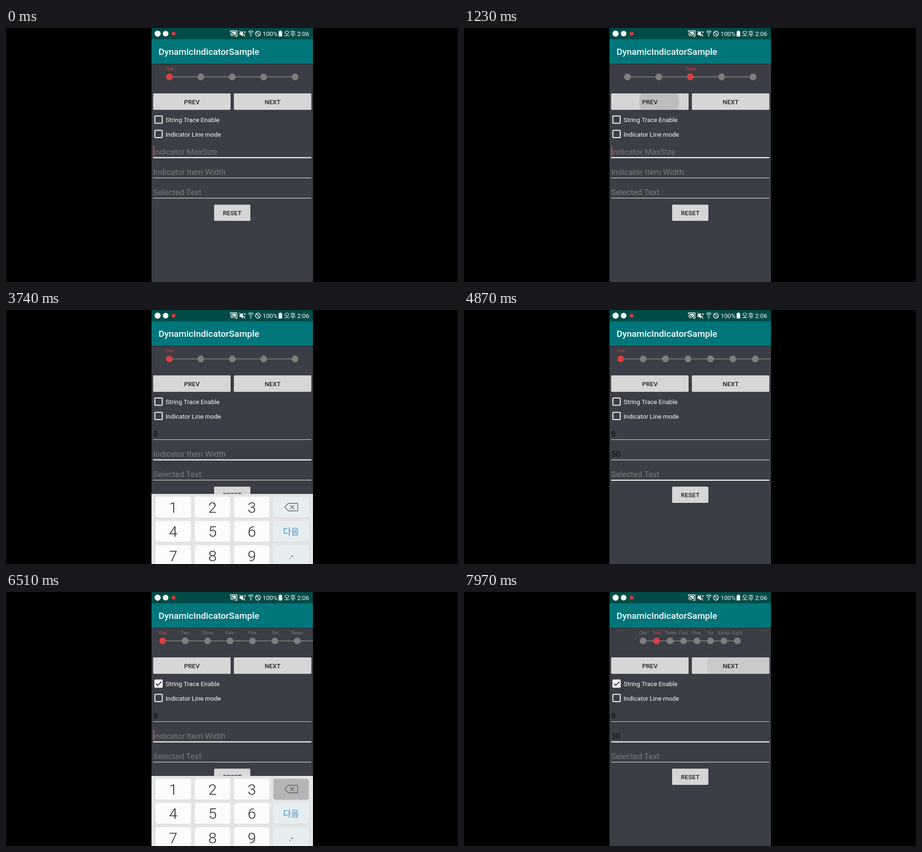
Animation, 960 px wide and 540 px high, one loop 8 s. Source, as an HTML page with a canvas:

```html
<!DOCTYPE html>
<html lang="en">
<head>
<meta charset="utf-8">
<title>DynamicIndicatorSample</title>
<style>
  html, body { margin: 0; width: 100%; height: 100%; overflow: hidden; background: #000; }
  canvas { display: block; }
</style>
</head>
<body>
<canvas id="stage" width="960" height="540"></canvas>
<script>
const ctx = document.getElementById('stage').getContext('2d');
const LOOP = 8000, LEFT = 309, WIDTH = 343;
const FONT = 'Roboto, "Noto Sans CJK KR", "Noto Sans CJK", sans-serif';
const NAMES = ['One', 'Two', 'Three', 'Four', 'Five', 'Six', 'Seven', 'Eight'];
const HINTS = ['Indicator MaxSize', 'Indicator Item Width', 'Selected Text'];
const KEYS = ['1', '2', '3', '⌫', '4', '5', '6', '다음', '7', '8', '9', '.-'];
const PALE = '#fafafa', PANEL = '#3b3e46', BUTTON = '#d6d6d6', GREY = '#7e7e7e', RED = '#d84040';

// Each track lists [start time, value]; a value holds until the next one.
const tracks = {
  selected: [[0, 0], [120, 1], [270, 2], [420, 3], [570, 4], [950, 3], [1130, 2], [1310, 1], [1490, 0], [7780, 1]],
  count: [[0, 5], [4700, 8]],
  itemWidth: [[0, 70], [4700, 50], [7300, 30]],
  trace: [[0, false], [5250, true]],
  focus: [[0, 0], [3200, 1], [4500, 2], [6000, 1]],
  maxSize: [[0, ''], [3000, '8']],
  widthText: [[0, ''], [3950, '5'], [4150, '50'], [6250, '5'], [6450, ''], [6850, '3'], [7000, '30']],
  caret: [[0, 0], [2000, 2000], [3000, 3000], [3200, 3200], [4150, 4150], [5100, 5100],
    [6000, 6000], [6450, 6450], [7000, 7000]]
};
const nextTaps = [120, 270, 420, 570, 7780];
const prevTaps = [950, 1130, 1310, 1490];
const keyTaps = [[3000, '8'], [3200, '다음'], [3950, '5'], [4500, '다음'], [6250, '⌫'], [6450, '⌫'], [6850, '3']];
const keyboardShown = [[2600, 4600], [6000, 7200]];

const valueAt = (name, t) => tracks[name].filter(k => k[0] <= t).pop()[1];
const clamp = x => Math.max(0, Math.min(1, x));

function rect(x, y, w, h, color, radius = 0) {
  ctx.fillStyle = color;
  ctx.beginPath();
  ctx.roundRect(x, y, w, h, radius);
  ctx.fill();
}
function disc(x, y, r, color) {
  ctx.fillStyle = color;
  ctx.beginPath();
  ctx.arc(x, y, r, 0, Math.PI * 2);
  ctx.fill();
}
function stroke(path, color, width) {
  ctx.strokeStyle = color;
  ctx.lineWidth = width;
  ctx.stroke(new Path2D(path));
}
function fillPath(path, color) {
  ctx.fillStyle = color;
  ctx.fill(new Path2D(path));
}
function text(str, x, baseline, size, color, align = 'left', weight = 400) {
  ctx.font = `${weight} ${size}px ${FONT}`;
  ctx.textAlign = align;
  ctx.fillStyle = color;
  ctx.fillText(str, x, baseline);
}

function drawHeader() {
  rect(LEFT, 0, WIDTH, 24, '#004b46');
  disc(322, 12, 6.5, PALE);
  disc(339, 12, 6, PALE);
  disc(356, 12, 4, '#c9403f');
  stroke('M476.5 9V6H490.5V17.5H486M476.5 11A7 7 0 0 1 483 17.5M476.5 14A4 4 0 0 1 480 17.5', PALE, 1.5);
  fillPath('M479 8H488V15H485A9 9 0 0 0 479 9.5Z', PALE);
  fillPath('M496 9.5H499L503 6V18L499 14.5H496Z', PALE);
  stroke('M496 6L508 18M506 7V10M508 7V11M506 13V15', PALE, 1.3);
  stroke('M514.5 8.5Q520 4 525.5 8.5M516.5 11.5Q520 8.5 523.5 11.5M520 13V18', PALE, 1.5);
  stroke('M529.7 12A5.3 5.3 0 1 0 540.3 12A5.3 5.3 0 1 0 529.7 12M531.5 8.3L538.5 15.7', PALE, 1.4);
  text('100%', 545, 17, 13.2, PALE);
  rect(579, 7, 7.5, 11, PALE, 1);
  rect(581, 5.5, 3.5, 2, PALE);
  text('오후', 590, 17, 14, PALE);
  text('2:06', 644, 17, 13.4, PALE, 'right');
  rect(LEFT, 24, WIDTH, 52, '#00767a');
  rect(LEFT, 76, WIDTH, 1.5, '#2b2f35');
  text('DynamicIndicatorSample', 324, 57, 19.06, PALE, 'left', 500);
}

function drawIndicator(t) {
  const count = valueAt('count', t), selected = valueAt('selected', t);
  const step = valueAt('itemWidth', t) * 0.953;
  const first = LEFT + Math.max(0, (WIDTH - count * step) / 2) + step / 2;
  rect(first, 103, step * (count - 1), 2, '#757575');
  for (let i = 0; i < count; i++) {
    const active = i === selected, x = first + i * step;
    disc(x, 104, 7.2, active ? RED : GREY);
    if (active || valueAt('trace', t)) text(NAMES[i], x, 89.5, 9.5, active ? RED : GREY, 'center');
  }
}

function drawButton(label, x, y, w, h, taps, t) {
  rect(x, y, w, h, BUTTON, 2);
  ctx.save();
  ctx.beginPath();
  ctx.roundRect(x, y, w, h, 2);
  ctx.clip();
  for (const tap of taps) {
    const age = t - tap;
    if (age < 0 || age > 300) continue;
    ctx.globalAlpha = 1 - clamp((age - 80) / 220);
    disc(x + w * 0.62, y + h / 2, 12 + age * 0.3, '#bcbcbc');
  }
  ctx.restore();
  text(label, x + w / 2, y + h / 2 + 5, 13.34, '#222', 'center', 500);
}

function drawCheckbox(label, y, checked) {
  ctx.strokeStyle = PALE;
  ctx.lineWidth = 2;
  ctx.beginPath();
  ctx.roundRect(316.2, y - 7.8, 15.6, 15.6, 1.5);
  ctx.stroke();
  if (checked) {
    rect(316, y - 8, 16, 16, PALE, 1);
    stroke(`M318.5 ${y}L322.3 ${y + 4}L330 ${y - 4}`, PANEL, 2);
  }
  text(label, 339, y + 5.2, 13.34, PALE);
}

function drawField(index, value, t) {
  const y = 275.5 + index * 43.1, focused = valueAt('focus', t) === index;
  text(value || HINTS[index], 312.5, y - 7, 17.15, value ? '#0c0c0e' : '#7a7a7a');
  rect(312.5, focused ? y - 1 : y - 0.6, 336, focused ? 2.2 : 1.2, focused ? PALE : '#d8d8d8');
  if (focused && (t - valueAt('caret', t)) % 1000 < 500) {
    const x = value ? 313 + ctx.measureText(value).width : 312.8;
    rect(x, y - 25, 2.2, 22, '#c04a58');
  }
}

function drawKeyboard(t) {
  const span = keyboardShown.find(([from, to]) => t >= from && t < to);
  if (!span) return;
  const shown = Math.min(clamp((t - span[0]) / 120), clamp((span[1] - t) / 120));
  ctx.save();
  ctx.translate(0, (1 - shown) * 149);
  rect(LEFT, 391, WIDTH, 149, '#e2e4e6');
  KEYS.forEach((key, i) => {
    const x = 317.5 + (i % 4) * 83.4, y = 397 + Math.floor(i / 4) * 51.5;
    const side = i % 4 === 3, cx = x + 37.7;
    const pressed = keyTaps.some(([at, name]) => name === key && t >= at && t < at + 120);
    rect(x, y + 1, 75.4, 44.5, '#d3d5d8', 5);
    rect(x, y, 75.4, 44.5, pressed ? '#b5b5b8' : side ? '#e6eef0' : '#fcfcfc', 5);
    if (key === '⌫') {
      stroke('M592 419L599.5 411H619.5V427H599.5ZM604 415L612 423M612 415L604 423', '#5c5c5e', 1.3);
    } else if (side) {
      text(key, cx, y + 29, 18.5, key === '다음' ? '#3f8fcf' : '#333', 'center');
    } else {
      text(key, cx, y + 33.5, 32, '#282828', 'center', 300);
    }
  });
  ctx.restore();
}

function draw(t) {
  rect(0, 0, 960, 540, '#000');
  ctx.save();
  ctx.beginPath();
  ctx.rect(LEFT, 0, WIDTH, 540);
  ctx.clip();
  rect(LEFT, 0, WIDTH, 540, PANEL);
  drawHeader();
  drawIndicator(t);
  drawButton('PREV', 312.5, 139, 164.5, 35, prevTaps, t);
  drawButton('NEXT', 484, 139, 164.5, 35, nextTaps, t);
  drawCheckbox('String Trace Enable', 194.8, valueAt('trace', t));
  drawCheckbox('Indicator Line mode', 225.3, false);
  drawField(0, valueAt('maxSize', t), t);
  drawField(1, valueAt('widthText', t), t);
  drawField(2, '', t);
  drawButton('RESET', 442, 375.5, 77, 34.5, [], t);
  drawKeyboard(t);
  ctx.restore();
}

const start = performance.now();
function tick() {
  draw((performance.now() - start) % LOOP);
  requestAnimationFrame(tick);
}
tick();
</script>
</body>
</html>
```
